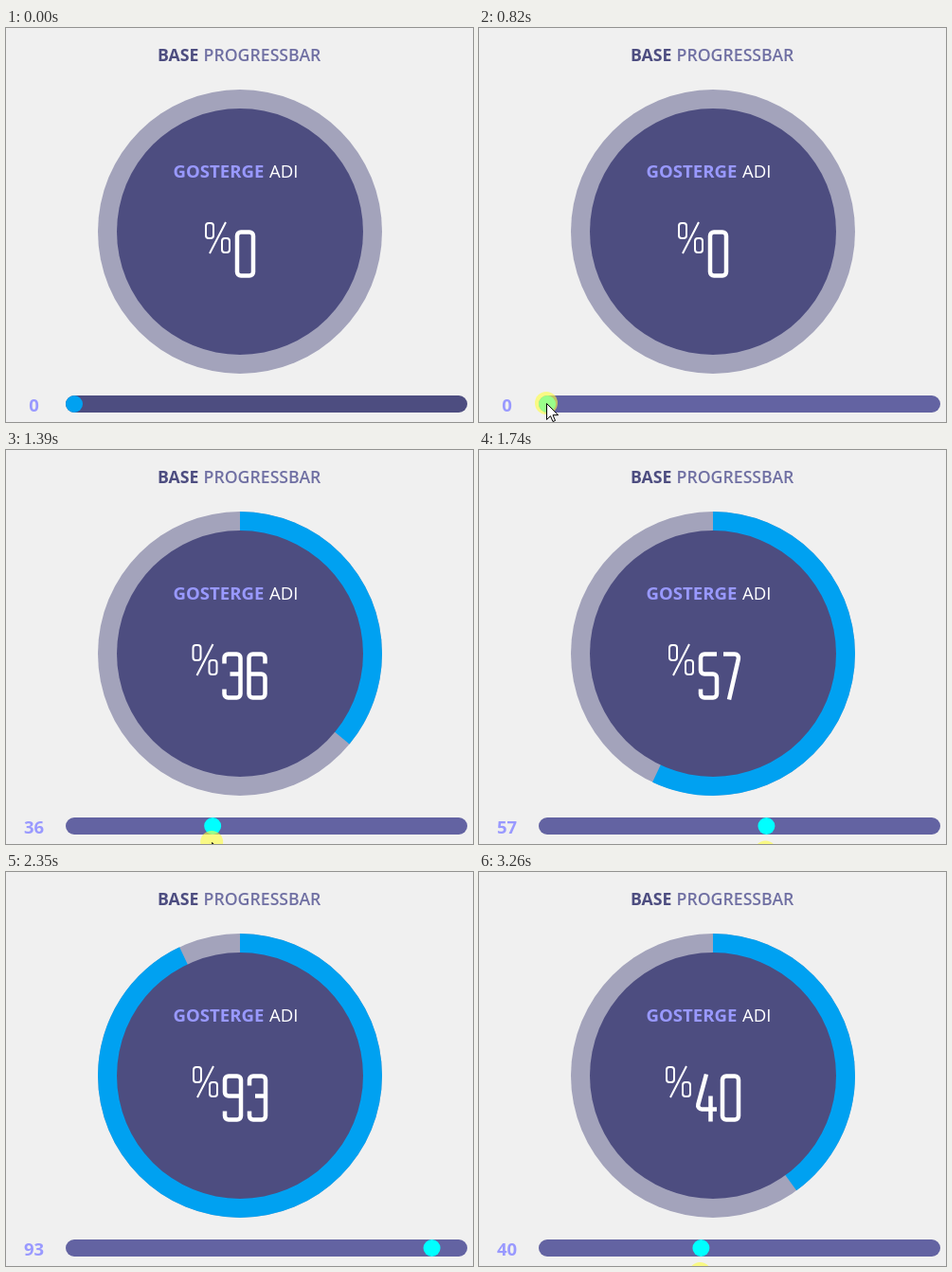
Recreate the animation shown at these times as an HTML page with a canvas. Size 493 px wide and 416 px high, loop 3.33 s.

```html
<!DOCTYPE html>
<html>
<head>
<meta charset="utf-8">
<style>
  html, body { margin: 0; width: 493px; height: 416px; overflow: hidden; background: #f0f0f0; }
  canvas { display: block; }
</style>
</head>
<body>
<canvas id="stage" width="493" height="416"></canvas>
<script>
const ctx = document.getElementById('stage').getContext('2d');
const LOOP = 3330, PRESS = 810, TICK = 69.5;
const NAVY = '#4d4d80', LILAC = '#9999ff', BLUE = '#00a1f1';

// Digits are rounded polylines through named points of one cell
const points = {
  a: [2, 2], b: [19, 2], c: [2, 23], d: [19, 23], e: [2, 48], f: [19, 48],
  p: [2, 12], q: [2, 39], r: [19, 12], m: [8, 23],
  g: [8, 50], n: [11, 0], h: [1, 37], i: [22, 37], j: [15.5, 23], k: [15.5, 50]
};
const digits = ['cabfec', 'bf', 'pabdef', 'pabfeq md', 'nhi jk',
  'bacdfeq', 'rbaefdc', 'abg', 'cabfec cd', 'dcabfeq'].map(roundedPath);
const narrowing = { 1: 4, 5: 2, 6: -1, 7: 4 };
const advance = d => 26 - (narrowing[d] || 0);

const percent = new Path2D('M22 0L5 33');
percent.roundRect(1, 1, 8, 16, 3);
percent.roundRect(18, 17, 8, 15, 3);
const arrow = new Path2D('M0 0V17L4 13.2L6.5 19L9 18L6.5 12.2H12Z');

function roundedPath(spec) {
  const path = new Path2D();
  for (const line of spec.split(' ')) {
    const pts = [...line].map(name => points[name]);
    path.moveTo(...pts[0]);
    for (let i = 1; i < pts.length - 1; i++) path.arcTo(...pts[i], ...pts[i + 1], 4);
    path.lineTo(...pts.at(-1));
  }
  return path;
}

const clamp = v => Math.min(1, Math.max(0, v));
const knobX = value => 72 + value * 4.06;

// Drag up to 93, short hold, then ease back to 40
function valueAt(step) {
  const rise = clamp(step / 22) ** 0.935;
  const fall = 1 - (1 - clamp((step - 24) / 11)) ** 1.24;
  return Math.round(93 * rise - 53 * fall);
}

// Arc onto the knob first, then follow it while drifting below the stage
function pointerAt(step, value) {
  if (step < 0) {
    const left = 1 - clamp((step + 12) / 9);
    return [71 + 40 * left ** 2, 396 - 60 * left + 90 * left ** 2];
  }
  return [knobX(value) - 1, step < 25 ? 396 + value * 0.5 : 424];
}

function disc(x, y, r, color) {
  ctx.fillStyle = color;
  ctx.beginPath();
  ctx.arc(x, y, r, 0, 2 * Math.PI);
  ctx.fill();
}

function text(str, x, y, size, weight, color, align = 'left') {
  ctx.font = `${weight} ${size}px "Open Sans", "Noto Sans", sans-serif`;
  ctx.fillStyle = color;
  ctx.textAlign = align;
  ctx.fillText(str, x, y);
}

function strokeAt(path, x, y, width, color = '#fff') {
  ctx.save();
  ctx.translate(x, y);
  ctx.lineWidth = width;
  ctx.strokeStyle = color;
  ctx.stroke(path);
  ctx.restore();
}

function drawGauge(value) {
  disc(247, 215, 150, '#a3a3bb');
  ctx.fillStyle = BLUE;
  ctx.beginPath();
  ctx.moveTo(247, 215);
  ctx.arc(247, 215, 150, -Math.PI / 2, (value / 50 - 0.5) * Math.PI);
  ctx.fill();
  disc(247, 215, 130, NAVY);
  text('GOSTERGE', 176.5, 158, 18.6, 700, LILAC);
  text('ADI', 278, 158, 18.6, 400, '#fff');

  const shown = [...String(value)];
  let x = 223 - shown.reduce((sum, d) => sum + advance(d), 0) / 2;
  strokeAt(percent, x, 205, 2);
  x += 32;
  for (const d of shown) {
    strokeAt(digits[d], x, 213.5, 4.5);
    x += advance(d);
  }
}

function drawSlider(value, hover, pressed) {
  text(value, 29.5, 405, 18.5, 700, LILAC, 'center');
  ctx.fillStyle = hover ? '#6363a2' : NAVY;
  ctx.beginPath();
  ctx.roundRect(63, 388, 424, 18, 9);
  ctx.fill();
  disc(knobX(value), 397, 9, pressed ? '#00ffff' : BLUE);
}

function drawPointer(x, y, pressed) {
  if (pressed) disc(x, y, 12, 'rgba(255,255,60,.6)');
  ctx.save();
  ctx.translate(x + 0.5, y + 0.5);
  ctx.fillStyle = '#fff';
  ctx.fill(arrow);
  ctx.restore();
  strokeAt(arrow, x + 0.5, y + 0.5, 1, '#000');
}

function draw(now) {
  const step = Math.floor((now % LOOP - PRESS) / TICK);
  const value = valueAt(step), pressed = step >= 0;
  const [x, y] = pointerAt(step, value);
  ctx.fillStyle = '#f0f0f0';
  ctx.fillRect(0, 0, 493, 416);
  text('BASE', 160, 35, 17.7, 700, NAVY);
  text('PROGRESSBAR', 208.5, 35, 17.7, 600, '#7070a3');
  drawGauge(value);
  drawSlider(value, pressed || y < 406, pressed);
  drawPointer(x, y, pressed);
  requestAnimationFrame(draw);
}
requestAnimationFrame(draw);
</script>
</body>
</html>
```
